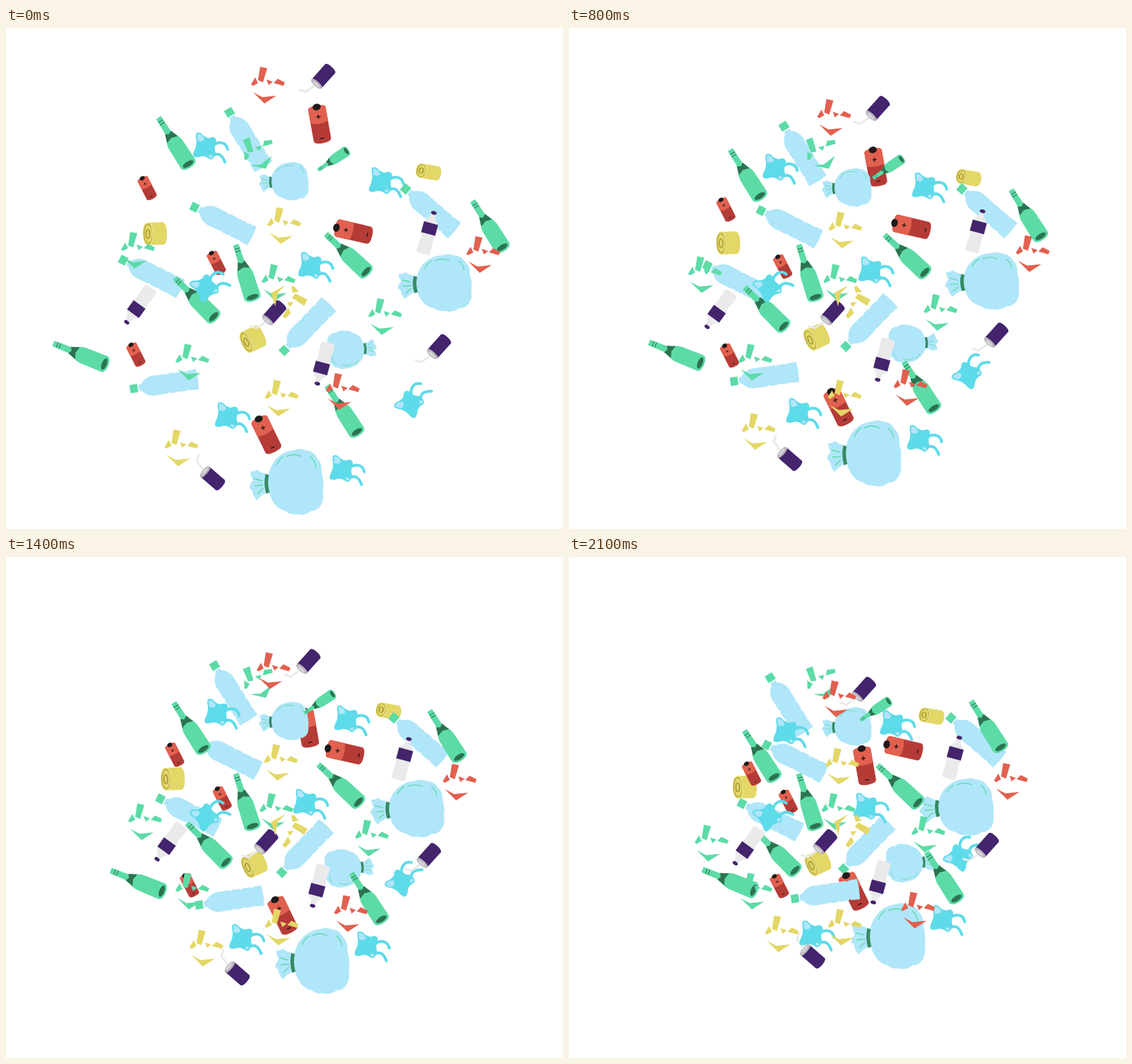
These frames come from a looping animation (789 by 710 pixels, 2.2 s). An HTML page:

```html
<!DOCTYPE html>
<html lang="en">
<head>
<meta charset="utf-8">
<title>Drifting litter</title>
<style>
  html, body { margin: 0; width: 100%; height: 100%; overflow: hidden; background: #fff; }
  svg { display: block; width: 789px; height: 710px; }
</style>
</head>
<body>
<svg id="stage" viewBox="0 0 789 710"></svg>
<script>
const GREEN = '#5ddba7', DARK_GREEN = '#2c7351', SKY = '#b0e6f9', CYAN = '#5edbe9';
const RED = '#b53b37', CORAL = '#e2604f', YELLOW = '#e3d766', OLIVE = '#a8983a';
const PURPLE = '#43246d', PALE = '#eaeaeb', BLACK = '#1f1a1a';

const fill = (color, d) => `<path fill="${color}" d="${d}"/>`;
const line = (color, width, d, cap = 'butt') =>
  `<path fill="none" stroke="${color}" stroke-width="${width}" stroke-linecap="${cap}" d="${d}"/>`;
const oval = (color, x, rx, ry) => `<ellipse cx="${x}" rx="${rx}" ry="${ry}" fill="${color}"/>`;

// Long items lie along the x axis, starting at the neck or cap.
const shapes = {
  wine:
    fill(GREEN, 'M0-4L24-4.5C30-5 36-11 46-11.5L78-12Q84-11 84 0Q84 11 78 12L46 11.5C36 11 30 5 24 4.5L0 4Z') +
    fill(DARK_GREEN, 'M25-5L37-9L34 0L37 9L25 5L28 0Z') +
    line(DARK_GREEN, 1, 'M6-4V4M10-4V4') +
    oval(DARK_GREEN, 78, 3.6, 8.5),

  water:
    fill(SKY, 'M7-4L11-5C17-13 25-15 34-14L46-14L48-12.5L50-14L60-14L62-12.5L64-14L75-14L77-12.5L79-14' +
      'L91-14.5L92 0L91 14.5L79 14L77 12.5L75 14L64 14L62 12.5L60 14L50 14L48 12.5L46 14L34 14C25 15 17 13 11 5L7 4Z') +
    fill(GREEN, 'M-5.5-6H5.5V6H-5.5Z'),

  sack:
    fill(SKY, 'M-38-9Q-50-11-54-15Q-60-11-64-13Q-63-5-60-2Q-66 4-65 8Q-60 10-60 16L-55 23Q-46 14-38 13Z') +
    fill(SKY, 'M-39-2C-38-22-22-38-2-39Q6-42 14-39Q26-38 30-30Q38-24 37-12Q41 0 39 10Q41 22 36 29' +
      'Q30 37 22 36Q12 43 2 40Q-8 41-14 36C-30 33-39 18-39-2Z') +
    line('#358a63', 5, 'M-40-9Q-43 2-39 14') +
    line(GREEN, 1.3, 'M-47-1L-59-4M-46 4L-58 5M-46 8L-54 15M-27-20Q-24-27-17-31M-13-31Q-2-36 9-31M21-31Q28-26 29-18'),

  tote:
    line(CYAN, 4, 'M12-1C17-6 30-7 32 5M10 14C18 9 24 12 28 23', 'round') +
    fill(CYAN, 'M-13-17Q-11-20-6-18Q-1-12 6-11Q13-14 15-10Q17-7 14-2Q13 5 15 10Q14 15 11 18' +
      'Q8 21 4 17Q-3 13-9 16Q-17 17-17 13Q-17 9-14 4Q-11-4-13-11Z') +
    fill(SKY, 'M-11-17Q-4-17-1-9Q-5-4-11-8ZM5 14Q9 11 11 15Q9 19 7 17Z'),

  shards: '<path d="M-11-25L-1-23L-7-3L-14-6ZM-24 0L-18-10L-14-2L-21 2ZM-2-7L7-4L1 1Z' +
    'M8-2L14-8L24-3L22 2ZM-21 11L-8 18L12 16L-5 27Z"/>',

  battery:
    fill(RED, 'M2-12.5H47Q52-12 52 0Q52 12 47 12.5H2Q-2 12-2 0Q-2-12 2-12.5Z') +
    fill(CORAL, 'M2-12.5H22Q26 0 22 12.5H2Q-2 12-2 0Q-2-12 2-12.5Z') +
    oval(BLACK, 0, 4.6, 5.8) +
    line(BLACK, 1.4, 'M11 0H17M14-3V3M45-2.8V2.8'),

  tin:
    fill(YELLOW, 'M-11-16H12Q17-14 17 0Q17 14 12 16H-11Q-17 14-17 0Q-17-14-11-16Z') +
    `<g fill="none" stroke="${OLIVE}"><ellipse cx="-9.5" rx="6" ry="13.5"/><ellipse cx="-10" rx="2.6" ry="6" stroke-width="1.6"/></g>` +
    line('#f3ecaa', 1, 'M-6-15Q0 0-6 15'),

  cup:
    line(PALE, 3, 'M-2 0L-19-4L-23-13') +
    fill(PURPLE, 'M0-9.5H29Q32-8 32 0Q32 8 29 9.5H0Z') +
    fill('#b9b5bd', 'M-1-9.5H2Q5 0 2 9.5H-1Q-4 8-4 0Q-4-8-1-9.5Z') +
    oval('#d8d5da', -1, 1.8, 6.5),

  soda:
    fill(PALE, 'M1-3L6-4C10-5 12-10 18-10.5L32-10.5Q38-8 44-9.5L56-10Q60-10 60-6V6Q60 10 56 10' +
      'L44 9.5Q38 8 32 10.5L18 10.5C12 10 10 5 6 4L1 3Z') +
    fill(PURPLE, 'M15-10.3H31V10.3H15Z') +
    oval(PURPLE, 0, 2.5, 4)
};

// Rows: x, y, angle, travel x, travel y, scale x, scale y. Layers run back to front.
const layers = [
  ['sack', [
    [620, 361, 0, -58, -7],
    [481.5, 456, 180, -6, -22, .67],
    [410, 643, 0, 55, -106, 1, 1.15]]],
  ['tin', [
    [211, 291.5, -2, 38, 34.5],
    [349.5, 441, -25, 3, -8],
    [598.5, 204, 10, -85, 21.5, 1.06, .64]]],
  ['water', [
    [316.5, 119.5, 58, -31.5, 51.5],
    [267, 254, 26.6, 13, 12.5],
    [166, 329, 26.6, 79, 20.5],
    [394, 457, -46, -5, -15],
    [566, 228, 40.5, -25, 0]]],
  ['battery', [
    [440, 112, 80, -25.5, 159.5],
    [468, 283, 13, -18, -17.5],
    [358, 554, 64, 34.5, -102.5],
    [193, 213, 63, 58.5, 80, .63],
    [291, 319, 63, 12.5, 14, .63],
    [177, 449, 63, 114, 3.5, .63]]],
  ['water', [[181, 511, -8.5, 139, -27]]],
  ['sack', [[402, 217, 0, 0, 23, .67]]],
  ['wine', [
    [216, 127, 57.5, 32.5, 119],
    [325.5, 307, 72.4, 0, 0],
    [453, 292, 43, -16, 3],
    [239, 354, 45, 26, 35],
    [661, 245, 57.5, -91.5, -41],
    [67, 447, 22, 122, -4],
    [454.5, 507, 57, 52, -88.5],
    [442, 201.5, -34, -29.5, 30, .62]]],
  ['cup', [[282, 629, 41, 52.5, -72]]],
  ['tote', [
    [282, 167, 0, 24.5, 79],
    [531, 216, 0, -73.5, 19.5],
    [431, 336, 0, -11, 17],
    [313, 549, 0, 30.5, -15],
    [475.5, 624, 0, 53, -112],
    [281, 367, -43, 0, 0],
    [571, 532, -68, -20, -107]]],
  ['soda', [
    [606, 262, 105, -53, -6],
    [171, 417, -54, 64.5, 17],
    [441, 504, -75, -10, -14.5]]],
  ['cup', [
    [440, 79, -48, -31.5, 119],
    [604, 462, -48, -21.5, -43],
    [370.5, 414, -48, -17, 0]]],
  ['shards', [
    [187, 314, 0, 15, 90.5],
    [358, 174, -32, 0, 0],
    [386, 359.5, 0, -4.5, 0],
    [537, 408, 0, -28, -16],
    [264, 472.5, 0, 0, 0]], GREEN],
  ['shards', [
    [394, 279, 0, -7, 16.5],
    [390.5, 523.5, 0, 0, 0],
    [248.5, 594, 0, 53, -61],
    [400, 388, 107, 0, 0]], YELLOW],
  ['shards', [
    [371, 80, 0, 12, 120],
    [676, 320, 0, -50, -3],
    [477, 514, 0, 17.5, -14.5]], CORAL]
];

const stage = document.getElementById('stage');
const movers = [];

function addItem(kind, [x, y, angle, dx, dy, sx = 1, sy = sx], color) {
  const item = document.createElementNS('http://www.w3.org/2000/svg', 'g');
  if (color) item.setAttribute('fill', color);
  item.innerHTML = shapes[kind];
  stage.append(item);
  const pose = k => item.setAttribute('transform',
    `translate(${x + dx * k} ${y + dy * k}) rotate(${angle}) scale(${sx} ${sy})`);
  pose(0);
  if (dx || dy) movers.push(pose);
}

for (const [kind, rows, color] of layers) rows.forEach(row => addItem(kind, row, color));

// Straight drift in 22 held steps of 100 ms, then a jump back.
const STEPS = 22, HOLD = 100;
const start = performance.now();
let shown = 0;

function tick() {
  const step = Math.floor((performance.now() - start) / HOLD) % STEPS;
  if (step !== shown) {
    movers.forEach(pose => pose(step / (STEPS - 1)));
    shown = step;
  }
  requestAnimationFrame(tick);
}
requestAnimationFrame(tick);
</script>
</body>
</html>
```
